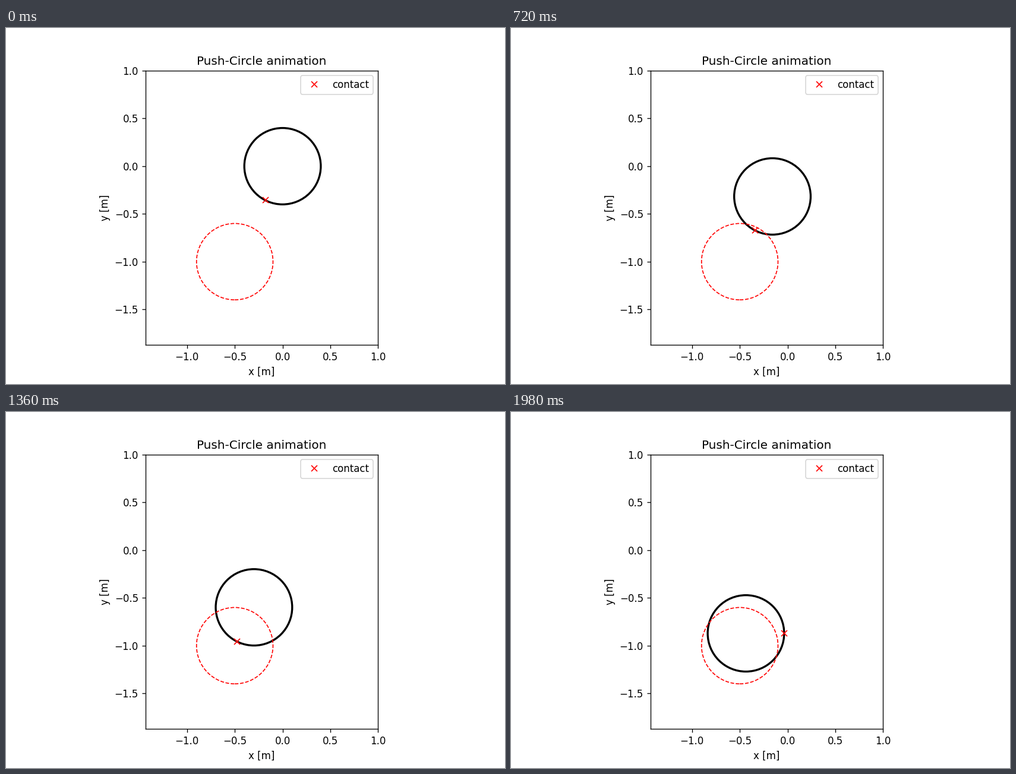
A matplotlib script that plays this animation: 840 px wide and 600 px high, repeating every 2000 ms.

```python
import numpy as np
import matplotlib.pyplot as plt
from matplotlib.animation import FuncAnimation
from matplotlib.patches import Circle

FRAMES = 100
RADIUS = 0.4
GOAL = np.array([-0.5, -1.0])
STEP = 0.0088 * np.array([0.5, 1.0])

heading = GOAL / np.linalg.norm(GOAL)
end = -STEP * (FRAMES - 1)

fig, ax = plt.subplots(figsize=(7, 5), dpi=120)
ax.set_aspect("equal", adjustable="box")
ax.set_xlim(end[0] - 1, 1)
ax.set_ylim(end[1] - 1, 1)
ax.set_xlabel("x [m]")
ax.set_ylabel("y [m]")
ax.set_title("Push-Circle animation")

body = ax.add_patch(Circle((0, 0), RADIUS, fill=False, ec="black", lw=2))
ax.add_patch(Circle(GOAL, RADIUS, fill=False, ec="red", ls="--", lw=1))
contact, = ax.plot([], [], "rx", label="contact")
ax.legend(loc="upper right")


def update(i):
    center = -STEP * i
    # the push ends on the last step, so the contact falls back to angle zero
    side = heading if i < FRAMES - 1 else np.array([1.0, 0.0])
    x, y = center + RADIUS * side
    body.center = center
    contact.set_data([x], [y])
    return body, contact


anim = FuncAnimation(fig, update, frames=FRAMES, interval=20,
                     repeat=True, repeat_delay=0)
plt.show()
```
